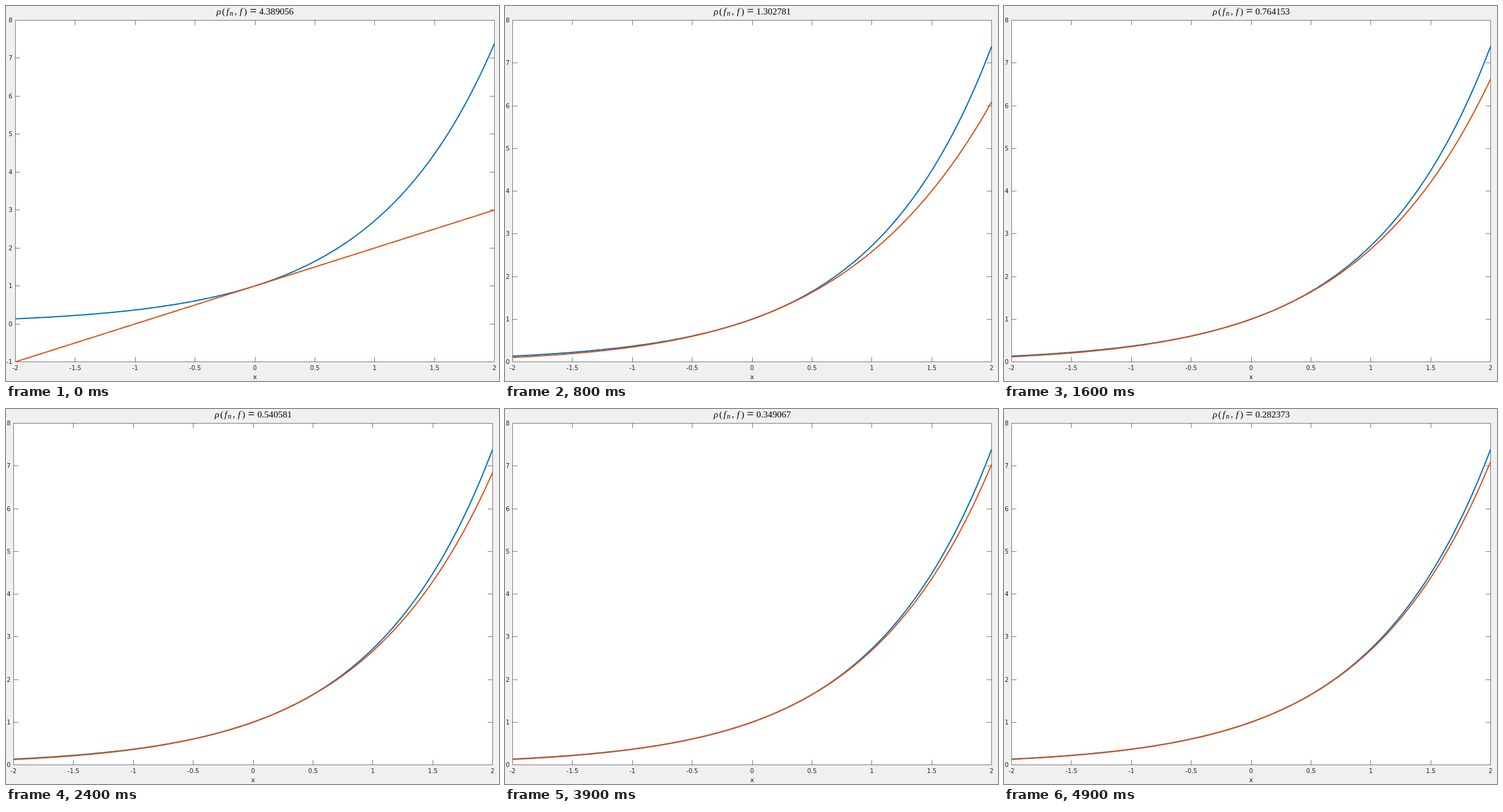
An HTML page that plays this animation: 810 by 617 pixels, repeating every 5 s.

```html
<!DOCTYPE html>
<html lang="en">
<head>
<meta charset="utf-8">
<title>Convergence to the exponential</title>
<style>
  html, body { margin: 0; width: 100%; height: 100%; overflow: hidden; background: #f0f0f0; }
  svg { display: block; width: 810px; height: 617px; }
  text { font-family: "DejaVu Sans", sans-serif; font-size: 10px; fill: #262626; }
  .mid { text-anchor: middle; }
  .end { text-anchor: end; }
  .name { font-size: 11px; }
  .axis { fill: none; stroke: #262626; stroke-opacity: .6; stroke-width: 1; }
  .curve { fill: none; stroke-width: 2; stroke-linejoin: round; }
  .math text { font-family: "Liberation Serif", "Times New Roman", serif; font-size: 15.1px; fill: #000; }
  .math .it { font-style: italic; }
  .math .sub { font-style: italic; font-size: 11.5px; }
  .math .eq { font-size: 20px; }
</style>
</head>
<body>
<svg viewBox="0 0 810 617">
  <defs><clipPath id="box"><rect x="15" y="23" width="788" height="563"/></clipPath></defs>
  <g id="plot">
    <rect x="15.5" y="23.5" width="787" height="562" fill="#fff"/>
    <path id="ticks" class="axis"/>
    <g id="labels"></g>
    <text class="mid name" x="409" y="614">x</text>
    <g clip-path="url(#box)">
      <polyline id="exact" class="curve" stroke="#0072bd"/>
      <polyline id="approx" class="curve" stroke="#d95319"/>
    </g>
    <g class="math">
      <text class="it" x="346" y="14">ρ</text>
      <text x="355" y="14">(</text>
      <text class="it" x="362" y="14">f</text>
      <text class="sub" x="367.6" y="16.3">n</text>
      <text x="375.6" y="14">,</text>
      <text class="it" x="384" y="14">f</text>
      <text x="391" y="14">)</text>
      <text class="eq" x="400.4" y="15.3">=</text>
      <text id="dist" x="416" y="14"></text>
    </g>
  </g>
</svg>
<script>
const L = 15.5, R = 802.5, T = 23.5, B = 585.5;
const STEPS = 50, STEP_MS = 100, TOP = 8, TICK = 8;
const el = id => document.getElementById(id);
const snap = v => Math.floor(v) + 0.5;
const px = x => L + (x + 2) / 4 * (R - L);
const py = (y, low) => B - (y - low) / (TOP - low) * (B - T);

function points(fn, low) {
  const out = [];
  for (let i = 0; i <= 160; i++) {
    const x = -2 + i / 40;
    out.push(px(x).toFixed(2) + "," + py(fn(x), low).toFixed(2));
  }
  return out.join(" ");
}

function drawAxes(low) {
  let d = `M${L} ${T}H${R}V${B}H${L}Z`, labels = "";
  for (let x = -2; x <= 2; x += 0.5) {
    const p = snap(px(x));
    if (Math.abs(x) < 2) d += `M${p} ${B}v${-TICK}M${p} ${T}v${TICK}`;
    labels += `<text class="mid" x="${px(x)}" y="599">${x}</text>`;
  }
  for (let y = low; y <= TOP; y++) {
    const p = snap(py(y, low));
    if (y > low && y < TOP) d += `M${L} ${p}h${TICK}M${R} ${p}h${-TICK}`;
    labels += `<text class="end" x="10.5" y="${p + 3.5}">${y}</text>`;
  }
  el("ticks").setAttribute("d", d);
  el("labels").innerHTML = labels;
  el("exact").setAttribute("points", points(Math.exp, low));
  // narrower tick labels pull the whole plot left
  el("plot").setAttribute("transform", low < 0 ? "" : "translate(-3 0)");
}

let shownN, shownLow;
function draw(n) {
  const power = x => Math.pow(1 + x / n, n);
  const low = n === 1 ? -1 : 0;
  if (low !== shownLow) drawAxes(shownLow = low);
  el("approx").setAttribute("points", points(power, low));
  el("dist").textContent = (Math.exp(2) - power(2)).toFixed(6);
}

function tick() {
  const n = Math.floor(performance.now() / STEP_MS) % STEPS + 1;
  if (n !== shownN) draw(shownN = n);
  requestAnimationFrame(tick);
}
tick();
</script>
</body>
</html>
```
